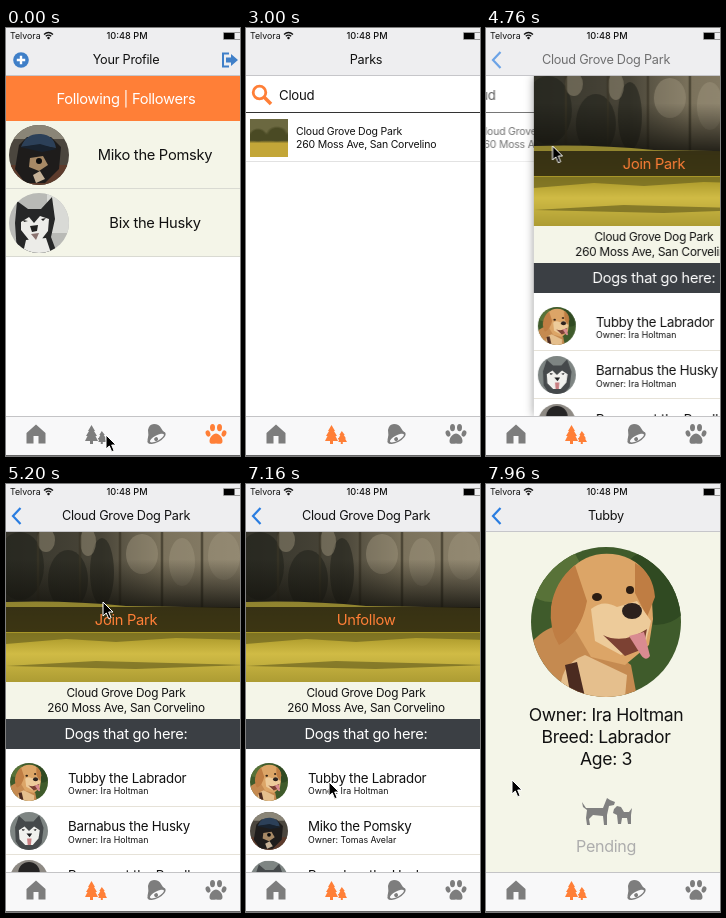
An HTML page for the animation above (8 s loop, 234 by 428 pixels).

```html
<!DOCTYPE html>
<html lang="en">
<head>
<meta charset="utf-8">
<title>Dog parks app</title>
<style>
:root { --orange: #ff7f37; --cream: #f4f5e8; --push: cubic-bezier(.15,.5,.2,1); }
* { box-sizing: border-box; letter-spacing: -.02em; }
html, body { margin: 0; width: 100%; height: 100%; overflow: hidden; }
body { background: #fff; font-family: Inter, "Liberation Sans", sans-serif; color: #111; }
#stage { position: relative; width: 234px; height: 428px; overflow: hidden; background: #fff; }
#stage div, #stage svg { position: absolute; }
.page { left: 0; top: 48px; width: 240px; height: 340px; background: #fff; overflow: hidden; }
.mid { left: 0; width: 240px; text-align: center; line-height: 20px; white-space: nowrap; }
.big { font-size: 14.7px; }
.face { border-radius: 50%; }

/* every animation runs on the same eight second clock */
.a { animation: 8s linear infinite; }
.cut { animation: 8s step-end infinite; }

/* bars */
#nav { left: 0; top: 0; width: 240px; height: 48px; background: #eeeef0; border-bottom: 1px solid #c6c6ca; }
#nav .mid { top: 22px; font-size: 12.7px; }
.status { top: 2px; line-height: 12px; font-size: 8.8px; white-space: nowrap; }
.clock { left: 1px; width: 240px; text-align: center; font-weight: 500; font-size: 9.2px; }
.status, .small { letter-spacing: 0; }
#tabs { left: 0; top: 388px; width: 240px; height: 40px; background: #f8f8f9; border-top: 1px solid #c4c4c6; border-bottom: 1px solid #666; color: #7d7d7d; }
#tabs svg { top: 6px; width: 22px; height: 22px; fill: currentColor; }

/* profile */
.strip { left: 0; top: 0; width: 240px; height: 45px; background: var(--orange); color: #fff; }
.pet { left: 0; width: 240px; height: 68px; background: var(--cream); border-bottom: 1px solid #d9dad2; }
.pet svg { left: 3px; top: 4px; width: 60px; height: 60px; }
.pet .mid { left: 29px; top: 24px; }

/* parks */
#search { left: 0; top: 0; width: 240px; height: 37px; border-bottom: 1px solid #333; }
#query { left: 33px; top: 9px; font-size: 13.2px; line-height: 20px; }
#query span { opacity: 0; animation-name: typed; animation-delay: calc(var(--i) * 230ms); }
#list, #hit { left: 0; top: 37.5px; width: 240px; }
#stage #list .park { position: relative; }
.park { width: 240px; height: 48.7px; border-bottom: 1px solid #e2e2e2; font-size: 10.5px; line-height: 13px; padding: 11px 0 0 50px; white-space: nowrap; }
.thumb { left: 4px; top: 5px; width: 38px; height: 38px;
  background: radial-gradient(ellipse 11px 8px at 27px 15px, var(--b) 70%, transparent), radial-gradient(ellipse 9px 7px at 8px 16px, var(--b) 70%, transparent),
  linear-gradient(var(--s) 34%, var(--b) 42% 56%, var(--g) 64%); }
.plaza { --s: #b9d1e2; --b: #4c5a50; --g: #b9b2a3; }
.tower { background: linear-gradient(transparent 68%, #566b35 70%), linear-gradient(90deg, #51713d 22%, #bfd9e0 23% 38%, #397f8f 39% 64%, #8eb7c2 65% 72%, #3c6673 73%); }
.grove { --s: #6b6840; --b: #4a4a24; --g: #c3a638; }
.lawn { --s: #d8e1e6; --b: #4d573d; --g: #82903f; }
.shade { --s: #cfd6cf; --b: #26351d; --g: #6a8d35; }
.block { --s: #7fb0dc; --b: #55604e; --g: #a3a49b; }

/* park detail */
.caption { left: 0; top: 150px; width: 240px; height: 37px; background: var(--cream); }
.caption .mid { font-size: 11.8px; }
.bar { left: 0; top: 187px; width: 240px; height: 30px; background: #3b3f44; color: #fff; }
.dogs { left: 0; top: 217px; width: 240px; height: 123px; overflow: hidden; }
.dog { left: 0; width: 240px; height: 48.6px; border-bottom: 1px solid #e6e2d8; white-space: nowrap; background: #fff; }
.dog svg { left: 4px; top: 5px; width: 38px; height: 38px; }
.dog .name { left: 62px; top: 9.5px; font-size: 13.3px; line-height: 20px; }
.dog .small { left: 62px; top: 26px; font-size: 8.8px; line-height: 14px; }
.join { top: 78px; color: var(--orange); }
#detail, #dog { box-shadow: 0 0 9px rgba(0,0,0,.4); }

/* dog page */
#card { inset: 0; background: var(--cream); }
#card .mid { font-size: 17.6px; line-height: 22px; }

#profile { animation-name: until-parks; }
#titleA { animation-name: until-parks; }
#titleB { animation-name: title-b; }
#titleC { animation-name: title-c; }
#titleD { animation-name: title-d; }
#back { animation-name: back; }
#tree { animation-name: tree; }
#paw { animation-name: paw; }
#list { animation-name: list; }
#hit { animation-name: hit; }
#fresh { animation-name: fresh; }
#hitRow { left: 0; top: 0; animation-name: press-park; }
#parks { animation-name: leave-parks; }
#detail { overflow: visible; animation-name: detail; }
#before { animation-name: until-join; }
#after, #mine { animation-name: from-join; }
#first { top: 9px; animation-name: press-dog; }
#mine { top: 57.6px; }
#rest { left: 0; top: 57.6px; animation-name: shift; }
#dog { animation-name: enter-dog; }
#card { animation-name: card; }
#cursor { animation-name: cursor; left: 0; top: 0; }
#cursor svg { animation-name: hide; left: -1px; top: -1px; }

@keyframes until-parks { 0% { visibility: visible } 3%, 100% { visibility: hidden } }
@keyframes title-b { 0%, 2.99% { opacity: 0 } 3%, 56.2% { opacity: 1 } 58.3%, 100% { opacity: 0 } }
@keyframes title-c { 0%, 57.5% { opacity: 0 } 61%, 91.75% { opacity: 1 } 93.9%, 100% { opacity: 0 } }
@keyframes title-d { 0%, 92.4% { opacity: 0 } 97%, 100% { opacity: 1 } }
@keyframes back { 0%, 56.6% { opacity: 0; stroke: #2a7de1 } 61%, 91.75% { opacity: 1; stroke: #2a7de1 } 92.8%, 94% { opacity: 1; stroke: #bbb } 97%, 100% { opacity: 1; stroke: #2a7de1 } }
@keyframes tree { 0% { color: #7d7d7d } 3%, 100% { color: var(--orange) } }
@keyframes paw { 0% { color: var(--orange) } 3%, 100% { color: #7d7d7d } }
@keyframes list { 0% { opacity: 0 } 5% { opacity: 1 } 25%, 100% { opacity: 0 } }
@keyframes hit { 0% { opacity: 0 } 25%, 100% { opacity: 1 } }
@keyframes fresh { 0% { opacity: 0 } 33.5%, 100% { opacity: 1 } }
@keyframes typed { 0% { opacity: 0 } 22% { opacity: 1 } 80%, 100% { opacity: 0 } }
@keyframes press-park { 0%, 53% { opacity: 1 } 55%, 57% { opacity: .22 } 60%, 100% { opacity: 1 } }
@keyframes press-dog { 0%, 89.75% { opacity: 1 } 91.5%, 92.5% { opacity: .35 } 96%, 100% { opacity: 1 } }
@keyframes leave-parks {
  0%, 56.3% { transform: none; opacity: 1; animation-timing-function: var(--push) }
  62.55% { transform: translateX(-72px); opacity: .6 }
  62.6%, 100% { transform: translateX(-72px); opacity: 0 }
}
@keyframes detail {
  0%, 56.3% { transform: translateX(260px); opacity: 1; animation-timing-function: var(--push) }
  62.55% { transform: none; opacity: 1 }
  91.75% { transform: none; opacity: 1; animation-timing-function: var(--push) }
  98%, 100% { transform: translateX(-72px); opacity: .35 }
}
@keyframes enter-dog {
  0%, 91.75% { transform: translateX(240px); visibility: hidden; animation-timing-function: var(--push) }
  98%, 100% { transform: none; visibility: visible }
}
@keyframes until-join { 0% { opacity: 1 } 70.5%, 100% { opacity: 0 } }
@keyframes from-join { 0% { opacity: 0 } 70.5%, 100% { opacity: 1 } }
@keyframes shift { 0% { transform: none } 70.5%, 100% { transform: translateY(48.6px) } }
@keyframes card { 0% { opacity: 0 } 96.5%, 100% { opacity: 1 } }
@keyframes hide { 0% { opacity: 1 } 21.5% { opacity: 0 } 40%, 100% { opacity: 1 } }
@keyframes cursor {
  0% { transform: translate(100px,407px) }
  2.5%, 11% { transform: translate(91px,401px); animation-timing-function: ease-in-out }
  18%, 40% { transform: translate(58px,68px); animation-timing-function: ease-in-out }
  43.5%, 50% { transform: translate(69px,104px); animation-timing-function: ease-in-out }
  52.5%, 59% { transform: translate(66px,118px); animation-timing-function: ease-in-out }
  64.5%, 65.5% { transform: translate(97px,118px) }
  67.5%, 71.5% { transform: translate(108px,132px); animation-timing-function: ease-in-out }
  80%, 81.5% { transform: translate(163px,288px); animation-timing-function: ease-in-out }
  89.5%, 93.75% { transform: translate(83px,298px); animation-timing-function: ease-in-out }
  99%, 100% { transform: translate(26px,296px) }
}
</style>
</head>
<body>
<svg width="0" height="0" style="position:absolute">
  <symbol id="pomsky" viewBox="0 0 60 60">
    <path fill="#4b463e" d="M0 0h60v60H0z"/><path fill="#8a8577" d="M0 0h60v14H0z"/><path fill="#5d3b2c" d="M0 40h60v20H0z"/>
    <path fill="#1e1c1b" d="M10 20l8-8 24 0 10 10-2 22-14 14H16L6 44z"/>
    <path fill="#2c4058" d="M12 22q5-14 20-13 13 1 15 14l-18-3z"/><path fill="#18222e" d="M11 22l20-3 17 5-15 3z"/>
    <path fill="#a78965" d="M21 33l13-2 5 9-9 6-10-4z"/><circle cx="30" cy="36" r="3" fill="#0c0c0c"/>
    <path fill="#c6b297" d="M24 50l7-4 5 8-9 4z"/>
  </symbol>
  <symbol id="husky" viewBox="0 0 60 60">
    <path fill="#b9bab6" d="M0 0h60v60H0z"/><path fill="#d9dad6" d="M38 0h22v40H38z"/>
    <path fill="#262727" d="M8 60l-2-30L8 8l11 8h13L43 4l3 22-4 18 6 16z"/>
    <path fill="#ecece8" d="M12 29l8-5 5 6 6-7 9 3-1 12-7 9-12 0-8-10zM17 47l20-2 5 15H14z"/>
    <path fill="#20201f" d="M21 33l8-1-1 6-5 1zM14 27l5 1-4 1zM32 26l5-1-3 3z"/><path fill="#8b7470" d="M22 41l8-1-3 7z"/>
  </symbol>
  <symbol id="malamute" viewBox="0 0 60 60">
    <path fill="#7e8583" d="M0 0h60v60H0z"/><path fill="#45494b" d="M9 46L8 24l6-18 10 9h13l9-10 7 20-3 24-9 11H18z"/>
    <path fill="#f1f1ee" d="M14 29l9-6 7 7 8-7 9 6-2 13-9 10H24l-9-9z"/>
    <path fill="#1c1d1f" d="M26 34h9l-4 6zM19 27l5 1-4 2zM37 28l5-1-2 3z"/><path fill="#c97f82" d="M27 42h7l-1 10h-5z"/>
  </symbol>
  <symbol id="poodle" viewBox="0 0 60 60">
    <path fill="#8e8a84" d="M0 0h60v60H0z"/><circle cx="30" cy="20" r="17" fill="#252424"/><path fill="#2e2c2b" d="M8 22h44v38H8z"/><path fill="#55504c" d="M23 28h14v18H23z"/>
  </symbol>
  <symbol id="lab" viewBox="0 0 150 150">
    <path fill="#3f5b2b" d="M0 0h150v150H0z"/><circle cx="125" cy="40" r="38" fill="#304a22"/><circle cx="20" cy="25" r="30" fill="#587238"/>
    <path fill="#c58a50" d="M0 96q24-28 54-12l46 34 6 32H0z"/><path fill="#e5bf8d" d="M30 150q-4-32 24-42l42 20-2 22z"/>
    <path fill="#4b2b20" d="M34 118l12-3 8 35H40z"/>
    <path fill="#dca567" d="M38 24Q58 2 88 8q24 6 32 28l2 36-4 26-24 20-34-8-20-34z"/>
    <path fill="#bf7d43" d="M44 18Q24 34 20 60q-2 22 8 38 22-12 28-44zM104 16q18 10 20 34l-8 20-12-24z"/>
    <path fill="#edcb9a" d="M60 62q12-10 26-2l20-6 14 20-6 24-24 10-26-14z"/>
    <path fill="#7c4133" d="M72 88q20 10 44-6l-4 20-18 7z"/>
    <path fill="#d98b91" d="M98 89l15-4 6 24q-4 6-9-1z"/>
    <ellipse cx="101" cy="64" rx="10" ry="8" fill="#2c211d"/><ellipse cx="66" cy="50" rx="5" ry="4" fill="#2c1d13"/><ellipse cx="99" cy="43" rx="4" ry="4" fill="#2c1d13"/>
  </symbol>
</svg>

<div id="stage">
  <div class="page a" id="parks">
    <div id="search">
      <svg width="30" height="34" style="left:0;top:4px" fill="none" stroke="#ff7f37"><circle cx="13.5" cy="12.5" r="6.3" stroke-width="2.8"/><path d="M18 17l7 7" stroke-width="3.6"/></svg>
      <div id="query"><span class="cut" style="--i:0">C</span><span class="cut" style="--i:1">l</span><span class="cut" style="--i:2">o</span><span class="cut" style="--i:3">u</span><span class="cut" style="--i:4">d</span></div>
    </div>
    <div id="list" class="cut">
      <div class="park"><div class="thumb plaza"></div>Lantern Bay Dog Park<br>382 Perlo St, San Corvelino</div>
      <div class="park"><div class="thumb tower"></div>Osprey Hill Dog Park<br>Tolven St &amp; Marle St, San Corvelino</div>
      <div class="park"><div class="thumb grove"></div>Cloud Grove Dog Park<br>260 Moss Ave, San Corvelino</div>
      <div class="park"><div class="thumb lawn"></div>Tamsin Park Dog Play Area<br>Tamsin St &amp; Quill St, San Corvelino</div>
      <div class="park"><div class="thumb shade"></div>LoHa West Dog Park<br>Lowland Fwy, San Corvelino</div>
      <div class="park"><div class="thumb block"></div>Belvora Park<br>4700 Corbin St, San Corvelino</div>
      <div class="park"><div class="thumb block"></div></div>
    </div>
    <div id="hit" class="cut">
      <div class="park a" id="hitRow"><div class="thumb plaza"></div><div class="thumb grove cut" id="fresh"></div>Cloud Grove Dog Park<br>260 Moss Ave, San Corvelino</div>
    </div>
  </div>

  <div class="page cut" id="profile">
    <div class="strip"><div class="mid big" style="top:13px">Following | Followers</div></div>
    <div class="pet" style="top:45px"><svg class="face"><use href="#pomsky"/></svg><div class="mid big">Miko the Pomsky</div></div>
    <div class="pet" style="top:113px"><svg class="face"><use href="#husky"/></svg><div class="mid big">Bix the Husky</div></div>
  </div>

  <div class="page a" id="detail">
    <svg width="240" height="150" style="left:0;top:0">
      <defs>
        <linearGradient id="wood"><stop stop-color="#35342b"/><stop offset=".4" stop-color="#4a4639"/><stop offset=".65" stop-color="#7b725c"/><stop offset="1" stop-color="#8a806a"/></linearGradient>
        <linearGradient id="dusk" x2="0" y2="1"><stop offset=".35" stop-color="#14130d" stop-opacity="0"/><stop offset="1" stop-color="#14130d" stop-opacity=".9"/></linearGradient>
        <linearGradient id="grass" x2="0" y2="1"><stop stop-color="#8e8230"/><stop offset=".4" stop-color="#a89628"/><stop offset=".65" stop-color="#d0bb45"/><stop offset="1" stop-color="#ad9c33"/></linearGradient>
      </defs>
      <path fill="url(#wood)" d="M0 0h240v78H0z"/>
      <g fill="#22231c" opacity=".6"><ellipse cx="14" cy="34" rx="24" ry="34"/><ellipse cx="62" cy="48" rx="20" ry="30"/><ellipse cx="96" cy="40" rx="12" ry="34"/></g>
      <g fill="#a0967e" opacity=".45"><ellipse cx="40" cy="8" rx="9" ry="12"/><ellipse cx="82" cy="10" rx="8" ry="14"/><ellipse cx="136" cy="22" rx="16" ry="20"/><ellipse cx="176" cy="30" rx="13" ry="24"/><ellipse cx="218" cy="24" rx="16" ry="24"/></g>
      <path stroke="#3a3527" stroke-width="2.500" opacity=".7" d="M32 0v76M74 0v76M114 0v76M156 0v76M196 0v76"/>
      <path fill="url(#dusk)" d="M0 0h240v78H0z"/>
      <path fill="url(#grass)" d="M0 70q60-2 120 4l120 2v74H0z"/>
      <path fill="#6d6420" opacity=".7" d="M0 101h240v7l-70-2-60 4-50-3-60 5zM0 134l90-5 150 4-110 4z"/>
      <path fill="#14110a" opacity=".72" d="M0 75h240v25H0z"/>
    </svg>
    <div class="mid big join cut" id="before">Join Park</div>
    <div class="mid big join cut" id="after">Unfollow</div>
    <div class="caption"><div class="mid" style="top:1px">Cloud Grove Dog Park</div><div class="mid" style="top:16px">260 Moss Ave, San Corvelino</div></div>
    <div class="bar"><div class="mid big" style="top:5px">Dogs that go here:</div></div>
    <div class="dogs">
      <div id="first" class="dog a"><svg class="face"><use href="#lab"/></svg><div class="name">Tubby the Labrador</div><div class="small">Owner: Ira Holtman</div></div>
      <div id="mine" class="dog cut"><svg class="face"><use href="#pomsky"/></svg><div class="name">Miko the Pomsky</div><div class="small">Owner: Tomas Avelar</div></div>
      <div id="rest" class="cut">
        <div class="dog" style="top:0"><svg class="face"><use href="#malamute"/></svg><div class="name">Barnabus the Husky</div><div class="small">Owner: Ira Holtman</div></div>
        <div class="dog" style="top:48.6px"><svg class="face"><use href="#poodle"/></svg><div class="name">Beaumont the Poodle</div><div class="small">Owner: Ira Holtman</div></div>
      </div>
    </div>
  </div>

  <div class="page a" id="dog">
    <div id="card" class="cut">
      <svg class="face" style="left:45px;top:15px;width:150px;height:150px"><use href="#lab"/></svg>
      <div class="mid" style="top:172px">Owner: Ira Holtman<br>Breed: Labrador<br>Age: 3</div>
      <svg width="52" height="32" style="left:95px;top:264px" fill="#808080">
        <path d="M1 6l4 6 17 0 4-10 3 2 5 2-1 3-5 1-2 9 0 10h-3l-1-9-10-1-4 4 1 6H6l-1-7 1-8-4-3z"/>
        <path d="M33 13l3-3 4 1 3 5h5l3-4-1 7 0 9h-3l-1-6h-5l-1 6h-3l-1-9-4-2z"/>
      </svg>
      <div class="mid" style="top:303px;font-size:16.1px;color:#adadad">Pending</div>
    </div>
  </div>

  <div id="nav">
    <div class="status" style="left:4px">Telvora</div>
    <svg width="12" height="9" style="left:37px;top:3px" fill="none" stroke="#111" stroke-width="1.3"><path d="M1 3.5q4.500-4 9 0M2.800 5.300q2.700-2.400 5.400 0"/><circle cx="5.500" cy="7" r=".6"/></svg>
    <div class="status clock">10:48 PM</div>
    <svg width="24" height="9" style="left:216px;top:4px"><path d="M1.500.5h20v7h-20z" fill="none" stroke="#999"/><path d="M2 1h10.500v6H2z"/></svg>
    <div class="cut" id="titleA" style="inset:0">
      <div class="mid">Your Profile</div>
      <svg width="18" height="18" style="left:6px;top:23px"><circle cx="9" cy="9" r="7.8" fill="#3f7fc8"/><path d="M9 4.800v8.400M4.800 9h8.400" stroke="#fff" stroke-width="2.400"/></svg>
      <svg width="18" height="18" style="left:215px;top:23px"><path d="M8 2.500H2v13h6" fill="none" stroke="#3f7fc8" stroke-width="2"/><path d="M5 6.500h5V3l7 6-7 6v-3.500H5z" fill="#3f7fc8"/></svg>
    </div>
    <div class="mid a" id="titleB">Parks</div>
    <div class="mid a" id="titleC">Cloud Grove Dog Park</div>
    <div class="mid a" id="titleD">Tubby</div>
    <svg class="a" id="back" width="14" height="20" style="left:4px;top:22px" fill="none" stroke-width="2.200"><path d="M10.500 2L3 10l7.500 8"/></svg>
  </div>

  <div id="tabs">
    <svg style="left:19px" viewBox="0 0 22 22"><path d="M11 1.500L1.500 10v10.500h7V13h5v7.500h7V10z"/></svg>
    <svg id="tree" class="cut" style="left:79px" viewBox="0 0 22 22"><path d="M6.500 2L10 8H9l3 5h-1.500l2.500 5H8v3H5v-3H0l2.500-5H1l3-5H3zM16.800 8l3 4h-1l2.200 3.500h-1l2 3.500h-4.200v2h-2v-2h-2.600l.8-1.500-1.200-2.500h1l1.500-3h-1z"/></svg>
    <svg style="left:139px" viewBox="0 0 22 22"><path d="M2.500 17Q4 12 3 7 4 1 9 1q5 0 7 4 2 4 4.500 5z"/><g transform="rotate(-28 11.500 14.800)"><ellipse cx="11.500" cy="14.800" rx="10" ry="4.600"/><ellipse cx="11.800" cy="15.200" rx="7.800" ry="2.700" fill="#f8f8f9"/><circle cx="10.500" cy="15.800" r="2"/></g></svg>
    <svg id="paw" class="cut" style="left:199px" viewBox="0 0 22 22"><path d="M11 10.500c3 0 6.500 4 6.500 7.500 0 4-4 2.500-6.500 2.500S4.500 22 4.500 18c0-3.500 3.500-7.500 6.500-7.500z"/><ellipse cx="7.500" cy="4.600" rx="2.500" ry="3.600"/><ellipse cx="14.500" cy="4.600" rx="2.500" ry="3.600"/><ellipse cx="3" cy="10.500" rx="2.300" ry="3.200" transform="rotate(-20 3 10.500)"/><ellipse cx="19" cy="10.500" rx="2.300" ry="3.200" transform="rotate(20 19 10.500)"/></svg>
  </div>

  <div id="cursor" class="a"><svg class="cut" width="14" height="20"><path d="M1 1v14l3.300-3 2.400 5.700 2.400-1L6.700 11H11z" stroke="#fff"/></svg></div>
</div>
<script>
// start the clock at load rather than at the first paint
const start = performance.now();
for (const anim of document.getAnimations()) anim.startTime = start;
</script>
</body>
</html>
```
